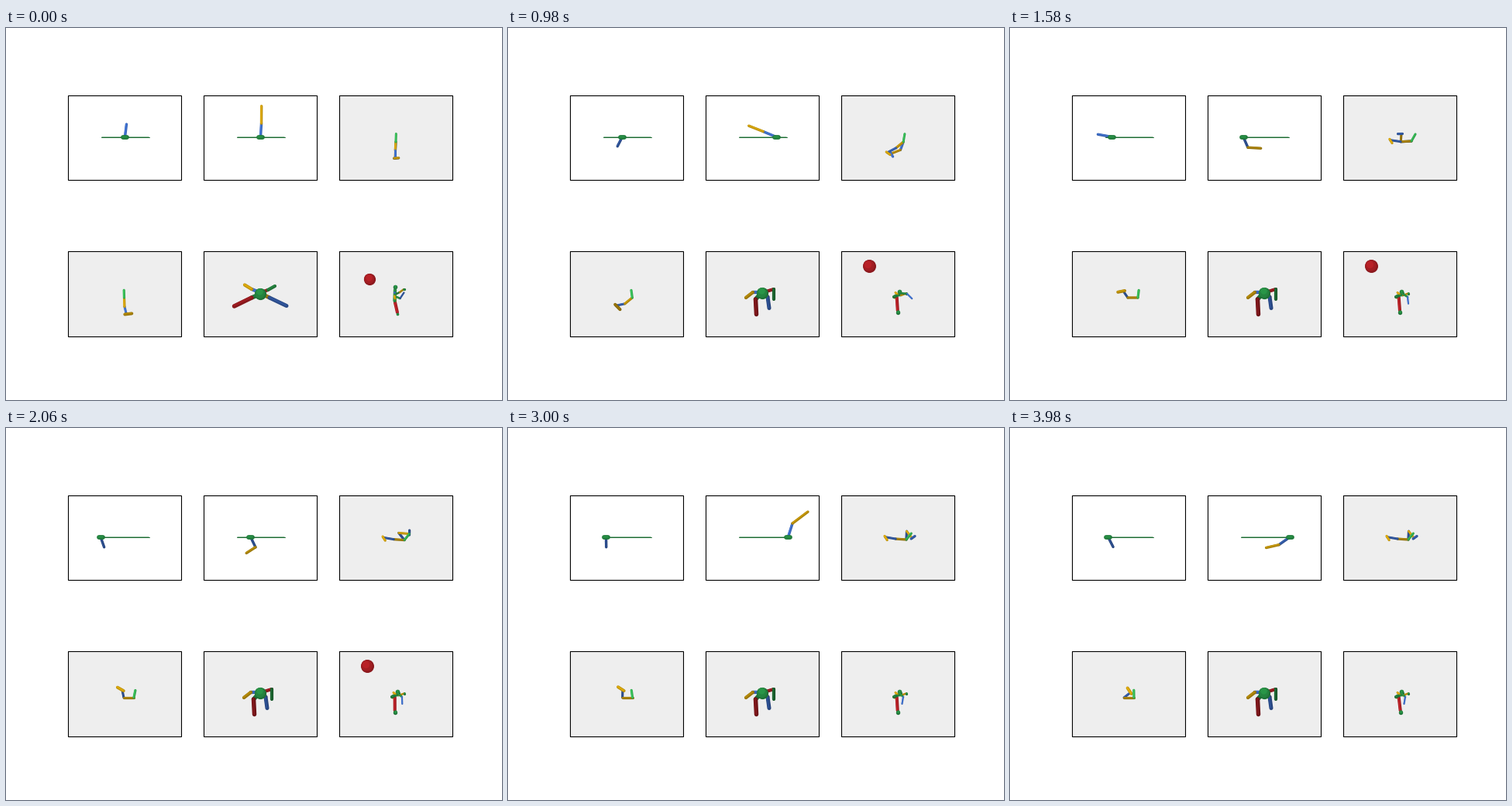
Animation, 640 px wide and 480 px high, one loop 4000 ms. Source, as a matplotlib script:

```python
import numpy as np
import matplotlib.pyplot as plt
from matplotlib.animation import FuncAnimation
from matplotlib.patches import Rectangle

N, STEP = 200, 20
T = np.arange(N) * STEP / 1000
TAU = 2 * np.pi
PX = 0.72  # points per pixel at 100 dpi

BLUE, GOLD = (64, 114, 208), (216, 166, 12)
RED, GREEN, LIME = (180, 32, 38), (40, 146, 70), (56, 190, 88)

fig = plt.figure(figsize=(6.4, 4.8), dpi=100, facecolor="white")
ax = fig.add_axes([0, 0, 1, 1])
ax.set_xlim(0, 640)
ax.set_ylim(480, 0)
ax.axis("off")

W = 496 / 3.4
H = W * .75
panels = []
for row in range(2):
    for col in range(3):
        corner = 80 + col * W * 1.2, 141.6 + row * 201.6 - H / 2
        face = "white" if row == 0 and col < 2 else "#eeeeee"
        panels.append(ax.add_patch(Rectangle(corner, W, H, fc=face, lw=0, zorder=0)))
        ax.add_patch(Rectangle(corner, W, H, fill=False, ec="black", lw=.8, zorder=9))


# motion, always as one value per frame

def ease(a, b, t0, t1):
    u = np.clip((T - t0) / (t1 - t0), 0, 1)
    return a + (b - a) * u * u * (3 - 2 * u)


def track(*points):
    """Monotone cubic through a few (time, value) points."""
    t, v = np.array(points, float).T
    h, d = np.diff(t), np.diff(v) / np.diff(t)
    m = np.concatenate([d[:1], np.zeros(len(d) - 1), d[-1:]])
    for i in range(1, len(d)):
        if d[i - 1] * d[i] > 0:
            m[i] = 2 * d[i - 1] * d[i] / (d[i - 1] + d[i])
    k = np.clip(np.searchsorted(t, T, "right") - 1, 0, len(h) - 1)
    u = np.clip((T - t[k]) / h[k], 0, 1)
    return (v[k] * (1 + 2 * u) * (1 - u) ** 2 + m[k] * h[k] * u * (1 - u) ** 2
            + v[k + 1] * u * u * (3 - 2 * u) + m[k + 1] * h[k] * u * u * (u - 1))


def blend(a, b, w):
    return tuple(s + (e - s) * w for s, e in zip(a, b))


def step(p, deg, lx, ly):
    a = np.radians(deg)
    return p[0] + lx * np.sin(a), p[1] - ly * np.cos(a)


# shaded solids

def spread(p):
    return np.array([np.broadcast_to(c, N) for c in p], float)


def tint(color, s):
    return tuple(np.clip(np.array(color) * s / 255, 0, 1))


parts = []


class Limb:
    """Capsule whose brightness follows the direction of its own 'up'."""

    def __init__(self, panel, p, q, color, w, hang=True):
        self.p, self.q, self.color, self.w = spread(p), spread(q), color, w
        dx, dy = (self.p - self.q) * (1 if hang else -1)
        self.shade = .83 + .17 * np.cos(np.arctan2(dx, -dy) + .4)
        self.lines = [ax.plot([], [], lw=w * k * PX, solid_capstyle="round",
                              clip_path=panels[panel])[0] for k in (1, .5)]
        for ln in self.lines:
            ln.set_clip_path(panels[panel])
        parts.append(self)

    def draw(self, i):
        for ln, k, off in zip(self.lines, (.9, 1.06), (0, -.14 * self.w)):
            ln.set_data([self.p[0, i] + off, self.q[0, i] + off],
                        [self.p[1, i] + off, self.q[1, i] + off])
            ln.set_color(tint(self.color, self.shade[i] * k))


class Ball:
    LAYERS = (1, .78, 0), (.84, .9, .12), (.55, 1.02, .28)

    def __init__(self, panel, c, r, color):
        self.c, self.r = spread(c), np.broadcast_to(r, N)
        self.dots = []
        for _, s, _ in self.LAYERS:
            dot, = ax.plot([], [], "o", mew=0, color=tint(color, s))
            dot.set_snap(False)
            dot.set_clip_path(panels[panel])
            self.dots.append(dot)
        parts.append(self)

    def draw(self, i):
        x, y, r = self.c[0, i], self.c[1, i], self.r[i]
        for dot, (k, _, off) in zip(self.dots, self.LAYERS):
            dot.set_data([x - off * r * .6], [y - off * r])
            dot.set_markersize(2 * r * k * PX)
            dot.set_visible(r > 0)


# carts with poles, seen slightly from above

def project(cx, x, h):
    f = 1 - .11 * h
    return cx + x / f, 140.5 - 15.5 * h / f


def cart(panel, cx, x, angles, size=1):
    Limb(panel, (cx - 30.5, 140.5), (cx + 31, 140.5), (36, 130, 62), 1)
    X, h, joint = x, 0 * x, project(cx, x, 0 * x)
    for a, color in zip(angles, (BLUE, GOLD)):
        X, h = X + 18.5 * size * np.sin(a), h + size * np.cos(a)
        tip = project(cx, X, h)
        Limb(panel, joint, tip, color, 3.4, hang=False)
        joint = tip
    Limb(panel, (cx + x - 2.5, 140.5), (cx + x + 2.5, 140.5), (40, 150, 72), 5.8)


# one long fall, then a decaying swing about the lowest point
FALL = .95
phase = np.interp(T, [FALL, 2.03, 3.98], [0, np.pi, 3.17 * np.pi])
swing = (.5 + 1.35 * np.exp((1.58 - T) / .5)) * np.sin(phase)
swing = np.where(T < FALL, 3.04 * ((T / FALL) ** 5 - 1), swing)
cart(0, 153.5, track((0, 0), (.98, -6), (2.06, -31.5), (2.66, -27)),
     [np.pi + swing], .95)

cart(1, 328.5,
     track((0, 0), (.98, 17.5), (1.58, -27.5), (2.06, -13), (2.45, 33), (4, 33)),
     [track((0, .05), (.56, -.15), (.98, -1.13), (1.58, -3.34), (2.06, -3.46),
            (2.66, -6.84), (3.34, -5.03), (3.98, -2.36)),
      track((0, 0), (.56, -.13), (.98, -1.15), (1.58, -4.63), (2.06, -2.26),
            (2.66, -4.71), (3.34, -5.86), (3.98, -1.87))])


# two-legged walker

def leg(hip, thigh, shin, foot, upper, lower):
    knee = step(hip, thigh, 13.8, 10.8)
    ankle = step(knee, shin, 13.8, 10.3)
    Limb(2, hip, knee, upper, 3.2)
    Limb(2, knee, ankle, lower, 3)
    Limb(2, step(ankle, foot, -1.5, -1.5), step(ankle, foot, 4.5, 4.5), upper, 3.2)


hip = (ease(503, 514, .2, 1.5) + 4 * np.exp(-((T - 1.58) / .25) ** 2),
       ease(147, 144, 1, 2.5))
shin = ease(182, 510, .35, 2.65)
leg(hip, ease(182, 362, .65, 2.6), shin, shin - 95, BLUE, GOLD)
leg(hip, ease(183, 275, .2, 1.9), ease(180, 283, .2, 1.7),
    ease(85, 148, .2, 1.5), GOLD, BLUE)
Limb(2, hip, step(hip, ease(2, 40, .5, 2.1), 10, 10.5), LIME, 3, hang=False)


# one-legged hopper

hip = ease(152.5, 165, .1, 1.6) + ease(0, -5, 2, 3.3), 348
knee = step(hip, ease(178, 270, .3, 1.6), 13, 11.5)
ankle = step(knee, ease(168, 350, 0, 2) + ease(0, 58, 2.6, 4), 11.5, 10)
toe = ease(83, 300, .5, 2) + ease(0, 26, 2, 2.8) * np.cos(TAU * (T - 3.98) / 1.28)
lean = 12 * np.sin(TAU * (T - 1.3) / 2.72)
Limb(3, knee, ankle, BLUE, 3)
Limb(3, hip, knee, GOLD, 3.2)
Limb(3, step(ankle, toe, -2, -2), step(ankle, toe, 7, 7), GOLD, 4, hang=False)
Limb(3, hip, step(hip, lean, 9.5, 9.7), LIME, 3.2, hang=False)


# four-legged walker dropping onto its feet

drop = 1 - np.exp(-4 * T) * np.cos(8 * T)


def ant_leg(root, knee, tip, inner, outer, w):
    k, e = blend(*knee, drop), blend(*tip, drop)
    Limb(4, root, k, inner, w, hang=False)
    Limb(4, k, e, outer, w, hang=False)


ant_leg((327, 341), ((317, 337), (316, 341)), ((308, 331.5), (307, 348)), BLUE, GOLD, 4.3)
ant_leg((330, 341), ((338, 338), (343, 337)), ((347, 333), (343, 350)), RED, GREEN, 4.2)
ant_leg((324, 345), ((317, 348), (319.5, 350)), ((294.5, 359), (320.5, 369.5)), GREEN, RED, 5.5)
ant_leg((332, 344), ((340, 348), (335, 347)), ((362, 358.5), (337, 361.5)), GOLD, BLUE, 5)
Ball(4, (328, ease(342.5, 341.5, 0, .5)), 7.6, GREEN)


# slumping figure beside a red ball

slump = ease(0, 1, 0, .75)


def fold(a, b):
    return blend(a, b, slump)


Ball(5, fold((469, 324), (465.7, 307)), np.where(T < 3, 7.6 + .9 * slump, 0), RED)
Limb(5, fold((502, 345), (501, 345)), fold((502.5, 358), (499, 348)), GOLD, 3.2)
ankle = ease(504, 502.7, 0, .75) + np.cos(TAU * (T - 2.66) / 1.36), ease(367, 364.5, 0, .75)
Limb(5, fold((502, 354), (501.7, 347.5)), ankle, RED, 4.1)
Ball(5, (ankle[0] + .4, ankle[1] + 2.3), 1.8 + .9 * slump, GREEN)
Limb(5, fold((502, 338), (507, 342.5)), fold((501.5, 352), (498, 347)), GREEN, 4.2)
Limb(5, fold((501.5, 346), (500, 341.5)), fold((502, 349), (503, 344)), GOLD, 3)
Ball(5, fold((501, 341), (506, 344)), 1.3, BLUE)
Ball(5, fold((502, 334), (505, 340)), 2.8, GREEN)

elbow, hand = fold((508, 341), (507, 345)), fold((513.5, 337), (514, 342.5))
Limb(5, fold((504, 343), (502, 345)), elbow, GREEN, 2.4)
Limb(5, elbow, hand, GOLD, 2.4)
Ball(5, hand, 1.6, GREEN)

elbow = (ease(508.5, 515, 0, .7) + ease(0, -5, .9, 2.5),
         ease(349, 343, 0, .6) + ease(0, 4, 1, 1.6))
hand = (track((0, 513.5), (.6, 524), (1.58, 514), (2.66, 508.5)),
        ease(341.5, 356, .2, 1.7))
Limb(5, fold((504, 347), (505, 342)), elbow, GREEN, 2.6)
Limb(5, elbow, hand, BLUE, 2.2)


def update(i):
    for part in parts:
        part.draw(i)
    return []


anim = FuncAnimation(fig, update, frames=N, interval=STEP, repeat=True, repeat_delay=0)
plt.show()
```
